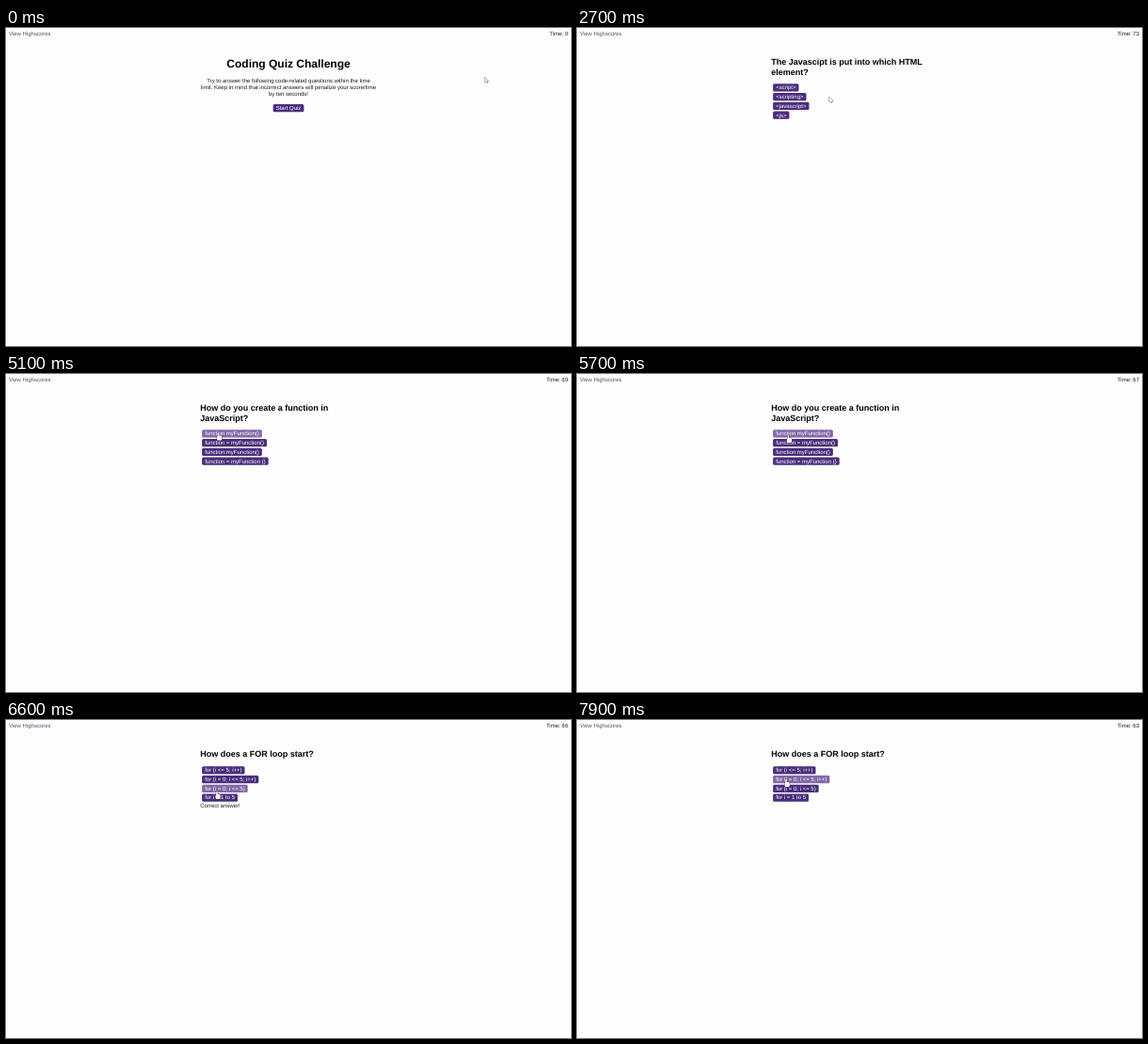
Animation of 600 by 338 pixels, one loop 8000 ms. Source, as an HTML page with a canvas:

```html
<!DOCTYPE html>
<html lang="en">
<head>
<meta charset="utf-8">
<title>Coding Quiz Challenge</title>
<style>
  html, body { margin: 0; width: 100%; height: 100%; overflow: hidden; background: #fdfdfe; }
  canvas { display: block; width: 600px; height: 338px; }
</style>
</head>
<body>
<canvas id="stage" width="600" height="338"></canvas>
<script>
const ctx = document.getElementById('stage').getContext('2d');
const LOOP = 8000, STEP = 100;
const SCALE = 0.375;            // the page is laid out 1600 px wide
const LEFT = 550, MID = 800;
const FONT = 'Arial, "Liberation Sans", sans-serif';
const PURPLE = '#4a2d7b', PURPLE_HOVER = '#8268a8';
const INK = '#1c1c20', LINK = '#565068';

const TICK_START = 1700, TICK = 500, SECONDS = 75;
const NOTE_TIME = 1000, HOVER_LAG = 200;

const intro = [
  'Try to answer the following code-related questions within the time',
  'limit. Keep in mind that incorrect answers will penalize your score/time',
  'by ten seconds!'
];

const questions = [
  { at: 1700,
    title: ['The Javascipt is put into which HTML', 'element?'],
    options: ['<script>', '<scripting>', '<javascript>', '<js>'] },
  { at: 3400, note: true,
    title: ['How do you create a function in', 'JavaScript?'],
    options: ['function myFunction()', 'function = myFunction()',
              'function:myFunction()', 'function = myFunction {}'] },
  { at: 5900, note: true,
    title: ['How does a FOR loop start?'],
    options: ['for (i <= 5; i++)', 'for (i = 0; i <= 5; i++)',
              'for (i = 0; i <= 5)', 'for i = 1 to 5'] }
];

// places the pointer visits, eased in between
const stops = [
  { t: 0, x: 508.5, y: 52.5 },
  { t: 200, x: 579.5, y: 6 },      // timer
  { t: 500, x: 9.5, y: 5 },        // highscores link
  { t: 1000, x: 306, y: 83 },      // start button
  { t: 1600, x: 311.5, y: 83 },
  { t: 2300, x: 212, y: 52 },      // reads the first question
  { t: 2700, x: 268, y: 73.5 },
  { t: 3300, x: 225, y: 63 },      // first answer
  { t: 4300, x: 226, y: 84 },      // down the list and back
  { t: 5100, x: 225.5, y: 62.5 },
  { t: 6000, x: 224, y: 66 },
  { t: 6600, x: 224, y: 76 },
  { t: 7900, x: 222, y: 63 }
];

const ease = k => k * k * (3 - 2 * k);
const mix = (a, b, k) => a + (b - a) * k;

function pointer(t) {
  const next = Math.max(1, stops.findIndex(s => s.t >= t));
  const a = stops[next - 1], b = stops[next];
  const k = ease((t - a.t) / (b.t - a.t));
  return { x: mix(a.x, b.x, k) / SCALE, y: mix(a.y, b.y, k) / SCALE };
}

function text(str, x, y, { size = 16, bold = false, align = 'left', color = INK } = {}) {
  ctx.font = `${bold ? 'bold ' : ''}${size}px ${FONT}`;
  ctx.textAlign = align;
  ctx.fillStyle = color;
  ctx.fillText(str, x, y);
}

function box(label, x, mid) {
  ctx.font = `16px ${FONT}`;
  return { label, x, y: mid - 11, w: ctx.measureText(label).width + 16, h: 22 };
}

function startButton() {
  const b = box('Start Quiz', 0, 227);
  b.x = MID - b.w / 2;
  return [b];
}

function optionButtons(q) {
  const first = 115 + 27 * q.title.length;
  return q.options.map((label, i) => box(label, LEFT + 5, first + 26 * i));
}

const buttonsFor = q => q ? optionButtons(q) : startButton();
const questionAt = t => questions.filter(q => q.at <= t).pop();
const inside = (p, b) => p.x >= b.x && p.x <= b.x + b.w && p.y >= b.y && p.y <= b.y + b.h;

function button(b, hover) {
  ctx.fillStyle = hover ? PURPLE_HOVER : PURPLE;
  ctx.beginPath();
  ctx.roundRect(b.x, b.y, b.w, b.h, 4);
  ctx.fill();
  text(b.label, b.x + 8, b.y + 16.2, { color: '#fff' });
}

function arrow() {
  ctx.moveTo(0, 0);
  ctx.lineTo(0, 14);
  ctx.lineTo(4, 11);
  ctx.lineTo(7, 16);
  ctx.lineTo(7, 10);
  ctx.lineTo(10, 10);
  ctx.closePath();
}

function hand() {
  ctx.roundRect(-2, 0, 4, 14, 2);
  ctx.roundRect(-4, 8, 14, 13, 4);
}

function cursor(p, shape, line) {
  ctx.save();
  ctx.translate(p.x, p.y);
  ctx.beginPath();
  shape();
  ctx.lineWidth = 2.2;
  ctx.lineJoin = 'round';
  ctx.strokeStyle = line;
  ctx.stroke();
  ctx.fillStyle = '#fff';
  ctx.fill();
  ctx.restore();
}

function draw(t) {
  ctx.setTransform(1, 0, 0, 1, 0, 0);
  ctx.fillStyle = '#fdfdfe';
  ctx.fillRect(0, 0, 600, 338);
  ctx.scale(SCALE, SCALE);

  const ticks = Math.floor((t - TICK_START) / TICK);
  text('View Highscores', 8, 22, { color: LINK });
  text('Time: ' + (ticks > 0 ? SECONDS - ticks : 0), 1592, 22, { align: 'right' });

  const q = questionAt(t), p = pointer(t);
  const buttons = buttonsFor(q);
  if (q) {
    q.title.forEach((line, i) =>
      text(line, LEFT, 105 + 27 * i, { size: 24, bold: true, color: '#000' }));
    if (q.note && t < q.at + NOTE_TIME) {
      text('Correct answer!', LEFT, 221 + 27 * q.title.length);
    }
  } else {
    text('Coding Quiz Challenge', MID, 112.5, { size: 32, bold: true, align: 'center', color: '#000' });
    intro.forEach((line, i) => text(line, MID, 155 + 18.6 * i, { align: 'center' }));
  }

  // hover follows a layout change with a short delay
  const hoverLayout = q && q.note ? buttonsFor(questionAt(t - HOVER_LAG)) : buttons;
  const hot = hoverLayout.findIndex(b => inside(p, b));
  buttons.forEach((b, i) => button(b, i === hot));

  const onLink = p.x < 128 && p.y < 28;
  if (hot >= 0 || onLink) cursor(p, hand, '#3a3444');
  else cursor(p, arrow, '#4c4c54');
}

function frame() {
  const t = performance.now() % LOOP;
  draw(Math.floor(t / STEP) * STEP);
  requestAnimationFrame(frame);
}

ctx.textRendering = 'geometricPrecision';
frame();
</script>
</body>
</html>
```
